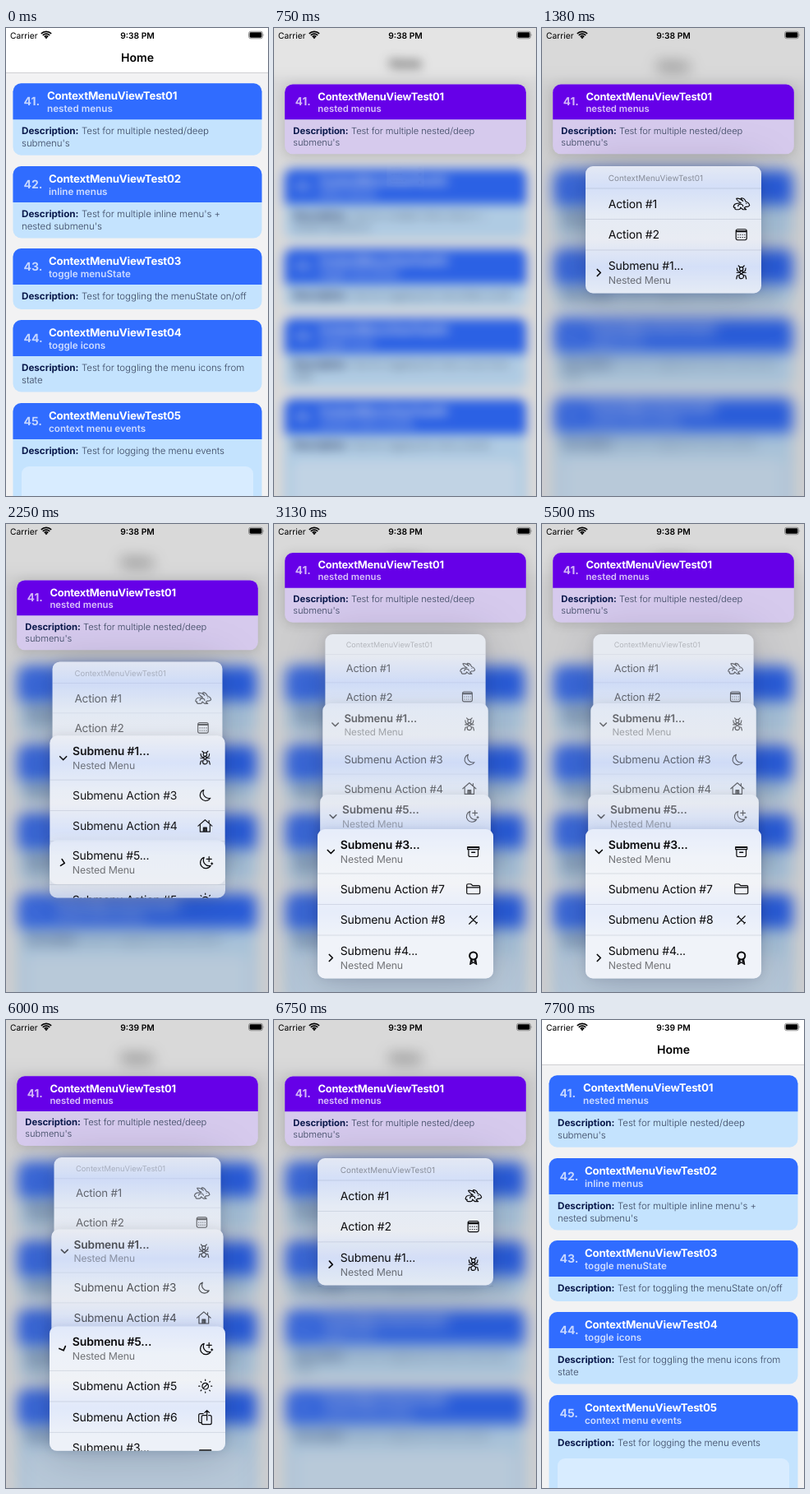
Recreate the animation shown at these times as an HTML page. Size 319 by 569 pixels, loop 7.9 s.

```html
<!DOCTYPE html>
<html lang="en">
<head>
<meta charset="utf-8">
<title>Nested context menus</title>
<style>
html, body { margin: 0; width: 100%; height: 100%; overflow: hidden; background: #f2f2f2; }
#stage { display: block; width: 319px; height: 569px; font-family: Inter, sans-serif; text-rendering: geometricPrecision; }
.bar { font-size: 10.3px; }
.semi { font-weight: 600; }
.home { font-size: 14.1px; font-weight: 600; text-anchor: middle; }
.num { font-size: 14px; font-weight: 700; fill: #fff; opacity: .72; }
.name { font-size: 13.3px; font-weight: 700; fill: #fff; letter-spacing: -.017em; }
.sub { font-size: 11.7px; font-weight: 600; fill: #fff; opacity: .76; }
.desc { font-size: 11.5px; font-weight: 300; fill: #3a4660; letter-spacing: -.004em; }
.desc .b { font-size: 11.7px; font-weight: 700; fill: #0b1a4c; }
.item { font-size: 14px; letter-spacing: -.012em; fill: #0b0b0d; }
.bold { font-weight: 600; }
.note { font-size: 12.3px; letter-spacing: -.012em; fill: #0b0b0d; opacity: .55; }
.cap { font-size: 9.9px; fill: #0b0b0d; opacity: .4; }
.icon { fill: none; stroke: #0b0b0d; stroke-width: 1.2; stroke-linecap: round; stroke-linejoin: round; }
.arrow { fill: none; stroke: #0b0b0d; stroke-width: 1.7; stroke-linecap: round; stroke-linejoin: round; }
.rule { stroke: #1c2b50; stroke-opacity: .17; stroke-width: .7; }
.shade { filter: drop-shadow(0 0 7px rgba(20, 30, 60, .13)); }
.menus { filter: drop-shadow(0 4px 28px rgba(0, 10, 40, .2)); }
</style>
</head>
<body>
<svg id="stage" viewBox="0 0 319 569"></svg>
<script>
const LOOP = 7900, WIDTH = 214, MID = 160, HEAD = 54, ROW = 37.5, SUB = 52.5, CAP = 27;
const stage = document.getElementById('stage');

function el(tag, attrs, parent, text) {
  const node = document.createElementNS('http://www.w3.org/2000/svg', tag);
  set(node, attrs);
  if (text) node.textContent = text;
  parent.append(node);
  return node;
}
function set(node, attrs) {
  for (const key in attrs) node.setAttribute(key, attrs[key]);
}
const label = (parent, cls, x, y, text) => el('text', { class: cls, x, y }, parent, text);
const clamp = x => Math.min(1, Math.max(0, x));
const lerp = (a, b, p) => a + (b - a) * p;
const ease = x => x * x * (3 - 2 * x);
const ramp = (t, start, length) => ease(clamp((t - start) / length));
const ring = (r, x = 0, y = 0) => `M${x - r} ${y}a${r} ${r} 0 1 0 ${2 * r} 0a${r} ${r} 0 1 0 ${-2 * r} 0z`;

// Icons, centred on 0,0
const moon = 'M-1.500-6.500A6.800 6.800 0 1 0 6.500 3.500A7 7 0 0 1-1.500-6.500z';
const box = 'M-6.500-4.500a2 2 0 0 1 2-2h9a2 2 0 0 1 2 2v9a2 2 0 0 1-2 2h-9a2 2 0 0 1-2-2z';
const icons = {
  rabbit: 'M-9.500 3.500q.5-4 5.500-4.200l3.500-.3q-5-3-5.500-5.500q4-.8 8 3q-3-2.500-2-3.500q4 0 5.500 4.500q4 1 4.500 4.500q-1.500 2-4.500 1.500l-2 1.500l2.500 2h-4l-3-2.500q0 2.500-2.500 2.500h-3q-2-.5-1-2.500q-1.500.5-2-1zM-4 3q0-2.500 3-2.500t3 2.500M6-.3h.1',
  calendar: box + 'M-6.500-4.500h13M-6.500-3.500h13M-4 0h.2M-1.300 0h.2M1.300 0h.2M4 0h.2M-4 3.300h.2M-1.300 3.300h.2M1.300 3.300h.2M4 3.300h.2',
  ant: ring(2.2, 0, -4.6) + ring(1.6, 0, -.5) + ring(2.8, 0, 4.4) + 'M-1.500-6.500l-2-2M1.500-6.500l2-2M-1.800-.8l-3-1.500l-.5-3M1.800-.8l3-1.500l.5-3M-2 0h-3.500M2 0h3.500M-2.500 3l-2.500.5l-1 4M2.500 3l2.500.5l1 4',
  moon,
  house: 'M-8.500 0L0-7.500L8.500 0M-6-2v9h12v-9M-2 7v-5h4v5M-.7 7v-4h1.400v4M4.800-6.500v3',
  night: moon + 'M4.500-7.500v6M1.500-4.500h6M8 0v2M7 1h2',
  sun: ring(3.8) + 'M0-8v1.200M0 7v1M-8 0h1.200M7 0h1M-5.600-5.600l.8.8M5 5l.7.7M-5.600 5.600l.8-.8M5-5l.7-.7M-2.500 2.500l5-5',
  share: 'M-2.500-4h-3.500a2 2 0 0 0-2 2v7a2 2 0 0 0 2 2h1.500M1-2h-3.500q-2 0-2 2v7q0 2 2 2h8q2 0 2-2v-7q0-2-2-2h-1.500M2 4v-12M-.8-5.300l2.800-2.800l2.800 2.800',
  archive: 'M-7-6h14v3.200h-14zM-7-5h14M-5.800-2.500v6.500q0 2 2 2h7.600q2 0 2-2v-6.500M-2 .5h4M-2 1h4',
  folder: 'M-8 4.500v-9q0-1.500 1.500-1.500h3.500l2 1.800h7.500q1.500 0 1.500 1.500v7.200q0 1.500-1.500 1.500h-13q-1.500 0-1.500-1.500zM-8-1.800h16',
  cross: 'M-4-4L4 4M4.500-4.500L-5 5M-4.800-3.200l1.600-1.600M3.200 4.800l1.600-1.600',
  rosette: ring(5, 0, -2.5) + ring(4.2, 0, -2.5) + 'M-3 2l-1 6l4-2.500l4 2.500l-1-6M-2.500 3l-.6 3.500M2.500 3l.6 3.500M-1.500 3.500v2M1.500 3.500v2',
  less: ring(7.3) + 'M2.300-3.200L-2.800 0L2.300 3.200',
  divide: box + 'M-3.500 0h7M0-3.300v.1M0 3.300v.1',
  fish: 'M-9 4q.5-4 5-5q1-3.500 4-3.500q1.500 0 2 2.500l2 1l-.5-3.500q2-.5 2.500 1.500q1.500-1 3.500 0q-.5 2.500-3 3q0 4-5 4h-9.500q-1 1-1 0zM-5 1.500h.1'
};

// Tint seen through the menus
const defs = el('defs', {}, stage);
const tint = el('linearGradient', { id: 'tint', gradientUnits: 'userSpaceOnUse', x1: 0, x2: 0, y1: 0, y2: 569 }, defs);
for (const y of [193, 290, 373, 471])
  for (const [d, color] of [[-33, '#e1e5ee'], [0, '#c5d4f5'], [33, '#dce4f1']])
    el('stop', { offset: (y + d) / 569, 'stop-color': color }, tint);

// Page
const page = el('g', {}, stage);
el('rect', { x: -40, y: -40, width: 400, height: 650, fill: '#f2f2f3' }, page);
el('rect', { x: -40, y: -40, width: 400, height: 94, fill: '#fff' }, page);
el('rect', { x: -40, y: 54, width: 400, height: .8, fill: '#c9c9cb' }, page);
label(page, 'home', MID, 41, 'Home');

function card(parent, n, y, height, sub, lines) {
  const g = el('g', { transform: `translate(8.5 ${y})` }, parent);
  const body = el('rect', { width: 303, height, rx: 10, fill: '#c4e3fe' }, g);
  const head = el('path', { d: 'M0 44V10a10 10 0 0 1 10-10h283a10 10 0 0 1 10 10v34z', fill: '#306cff' }, g);
  label(g, 'num', 13, 26.5, `${40 + n}.`);
  const x = n > 1 ? 43.5 : 41.5;
  label(g, 'name', x, 20, 'ContextMenuViewTest0' + n);
  label(g, 'sub', x, 34.5, sub);
  const text = el('text', { class: 'desc', x: 10.5, y: 62 }, g);
  el('tspan', { class: 'b' }, text, 'Description:');
  el('tspan', { dx: 3.5 }, text, lines[0]);
  if (lines[1]) label(g, 'desc', 10.5, 76.5, lines[1]);
  return { body, head };
}
card(page, 2, 168, 87.5, 'inline menus', ["Test for multiple inline menu's +", "nested submenu's"]);
card(page, 3, 268, 74, 'toggle menuState', ['Test for toggling the menuState on/off']);
card(page, 4, 355, 87.5, 'toggle icons', ['Test for toggling the menu icons from', 'state']);
card(page, 5, 456, 160, 'context menu events', ['Test for logging the menu events']);
el('rect', { x: 19, y: 533, width: 282, height: 70, rx: 9, fill: '#d8ecff' }, page);

const dim = el('rect', { width: 319, height: 569, fill: '#000' }, stage);
const lift = el('g', {}, stage);
const first = card(lift, 1, 67.2, 87.5, 'nested menus', ['Test for multiple nested/deep', "submenu's"]);

// Menus: [head number, head icon, rows]; the last row of each opens the next
const menus = [
  [0, '', [['Action #1', 'rabbit'], ['Action #2', 'calendar']]],
  [1, 'ant', [['Submenu Action #3', 'moon'], ['Submenu Action #4', 'house']]],
  [5, 'night', [['Submenu Action #5', 'sun'], ['Submenu Action #6', 'share']]],
  [3, 'archive', [['Submenu Action #7', 'folder'], ['Submenu Action #8', 'cross']]],
  [4, 'rosette', [['Submenu Action #9', 'less'], ['Submenu Action #10', 'divide'], ['Submenu Action #11', 'fish']]]
];
const layer = el('g', { class: 'menus' }, stage);

const icon = (parent, name, y) => el('path', { class: 'icon', d: icons[name], transform: `translate(189.7 ${y})` }, parent);
const rule = (parent, y) => el('path', { class: 'rule', d: `M0 ${y}h${WIDTH}` }, parent);

function subRow(parent, [n, name], y) {
  const g = el('g', { transform: `translate(0 ${y})` }, parent);
  const title = label(g, 'item', 27.8, 24, `Submenu #${n}...`);
  label(g, 'note', 27.8, 41, 'Nested Menu');
  icon(g, name, 27.5);
  const arrow = el('path', { class: 'arrow', d: 'M-2-4L2 0L-2 4' }, g);
  const turn = a => set(arrow, { transform: `translate(16.3 27.5) rotate(${a})` });
  turn(0);
  return { g, title, turn };
}

const panels = menus.map((menu, i) => {
  const g = el('g', {}, layer);
  const back = el('rect', { class: 'shade', rx: 9, fill: 'url(#tint)' }, g);
  const gloss = el('rect', { rx: 9, fill: '#fff' }, g);
  const view = el('svg', {}, g);
  const head = i ? subRow(view, menu, 0) : null;
  if (!i) label(view, 'cap', 27.8, 18, 'ContextMenuViewTest01');
  let y = i ? HEAD : CAP;
  for (const [text, name] of menu[2]) {
    rule(view, y);
    label(view, 'item', 27.8, y + 23.8, text);
    icon(view, name, y + ROW / 2);
    y += ROW;
  }
  const next = menus[i + 1];
  if (next) rule(view, y);
  const link = next && subRow(view, next, y);
  return { g, back, gloss, view, head, link, linkY: y, full: next ? y + SUB : y };
});

// Resting tops of the open panels, by depth
const tops = [
  [168],
  [167.5, 258],
  [167, 253.3, 368],
  [134, 218, 329, 371],
  [133, 214, 322, 368.5, 385]
];
const cardShift = [0, 0, -.3, -33.5, -33.8];
const opens = [1640, 2140, 2640, 3390];
const closes = [[4890, 450], [5510, 360], [5860, 450], [6340, 450]];

function depthAt(t) {
  let d = 0;
  for (const start of opens) d += ramp(t, start, 480);
  for (const [start, length] of closes) d -= ramp(t, start, length);
  return clamp(d / 4) * 4;
}

function drawPanel(panel, i, depth) {
  const n = Math.min(3, Math.floor(depth + 1e-6)), f = clamp(depth - n);
  const open = i ? clamp(depth - i + 1) : 1;
  const shown = open > .001;
  panel.g.style.display = shown ? '' : 'none';
  if (!shown) return;

  const from = i <= n ? tops[n][i] : tops[n][n] + panels[n].linkY;
  const y = lerp(from, tops[n + 1][i] ?? from, f);
  const scale = 1 - .0293 * Math.max(0, depth - i);
  const tall = lerp(i ? SUB : panel.full, panel.full, open);
  const width = WIDTH * scale, height = tall * scale;
  const frame = { x: MID - width / 2, y, width, height };
  const cover = clamp(depth - i);
  const solid = clamp(open * 5);

  set(panel.back, { ...frame, opacity: solid });
  set(panel.gloss, { ...frame, opacity: solid * lerp(.25 + .11 * i, .17, cover) });
  set(panel.view, { ...frame, viewBox: `0 0 ${WIDTH} ${tall}`, opacity: lerp(1, .58, cover) });
  if (panel.head) {
    panel.head.turn(90 * open);
    panel.head.title.classList.toggle('bold', open > .3);
  }
  if (panel.link) panel.link.g.style.display = cover > .001 ? 'none' : '';
}

// Status bar
const bar = el('g', {}, stage);
label(bar, 'bar', 5, 12.5, 'Carrier');
for (const r of [3.2, 6, 8.8])
  el('path', {
    d: `M${49 - r * .7} ${13 - r * .7}A${r} ${r} 0 0 1 ${49 + r * .7} ${13 - r * .7}`,
    fill: 'none', stroke: '#000', 'stroke-width': 1.7
  }, bar);
el('path', { d: 'M49 13.200l-1.700-1.800q1.700-1.400 3.400 0z' }, bar);
const clock = label(bar, 'bar semi', MID, 12.5, '');
clock.setAttribute('text-anchor', 'middle');
el('rect', { x: 295.5, y: 4.2, width: 17, height: 8.6, rx: 2.4, fill: 'none', stroke: '#777', 'stroke-width': .8 }, bar);
el('rect', { x: 296.6, y: 5.3, width: 14.8, height: 6.4, rx: 1.4 }, bar);
el('path', { d: 'M313.600 7q1.200 1.500 0 3z', fill: '#777' }, bar);

function draw(t) {
  const depth = depthAt(t);
  const blur = ramp(t, 390, 560) - ramp(t, 6850, 500);
  const press = ramp(t, 380, 400) - ramp(t, 6880, 470);
  const pop = ramp(t, 720, 400) - ramp(t, 6810, 340);
  const active = t >= 740 && t < 6950;

  page.style.filter = blur > .001 ? `blur(${9.5 * blur}px)` : 'none';
  set(page, { transform: `translate(159.5 284.5) scale(${1 - .04 * blur}) translate(-159.5 -284.5)` });
  set(dim, { opacity: .15 * blur });

  const n = Math.min(3, Math.floor(depth));
  const shift = lerp(cardShift[n], cardShift[n + 1], depth - n);
  set(lift, { transform: `translate(160 ${110.8 + shift}) scale(${1 - .031 * press}) translate(-160 -110.8)` });
  lift.style.filter = press > .001 ? `drop-shadow(0 2px 7px rgba(0,0,0,${.16 * press}))` : 'none';
  set(first.head, { fill: active ? '#6600e8' : '#306cff' });
  set(first.body, { fill: active ? '#d6caed' : '#c4e3fe' });

  layer.style.display = pop > .001 ? '' : 'none';
  set(layer, {
    opacity: clamp(pop * 1.6),
    transform: `translate(160 158) scale(${lerp(.2, 1, pop)}) translate(-160 -158)`
  });
  panels.forEach((panel, i) => drawPanel(panel, i, depth));
  clock.textContent = t < 5630 ? '9:38 PM' : '9:39 PM';
}

const begin = performance.now();
function tick() {
  draw((performance.now() - begin) % LOOP);
  requestAnimationFrame(tick);
}
tick();
</script>
</body>
</html>
```
